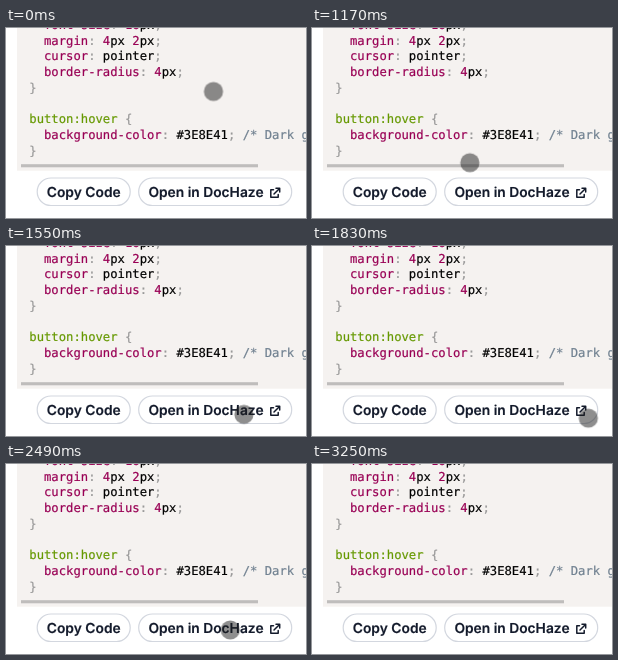
An HTML page for the animation above (4540 ms loop, 300 px wide and 190 px high).

```html
<!DOCTYPE html>
<html lang="en">
<head>
<meta charset="utf-8">
<title>Code sample with buttons</title>
<style>
  html, body { margin: 0; width: 100%; height: 100%; overflow: hidden; background: #fff; }
  svg { display: block; width: 300px; height: 190px; }
  text { white-space: pre; text-rendering: geometricPrecision; }
  .code { font: 12.22px "DejaVu Sans Mono", monospace; color: #000; }
  .code text, .code tspan { fill: currentColor; stroke: currentColor; stroke-width: .2; }
  .property, .number { color: #905; }
  .selector { color: #690; }
  .punctuation { color: #999; }
  .comment { color: #708090; }
  .button rect { fill: #fff; stroke: #d3d7df; stroke-width: 1.2; }
  .button text { font: 600 13.8px Inter, sans-serif; fill: #131a2b; stroke: #131a2b; stroke-width: .15; }
  .icon { fill: none; stroke: #131a2b; stroke-width: 1.5; stroke-linecap: round; stroke-linejoin: round; }
  .pointer { fill: rgba(30, 30, 30, .5); animation: roam 4540ms linear infinite; }

  @keyframes roam {
    0%      { transform: translate(207.5px, 63.5px); animation-timing-function: step-end; }
    21.806% { transform: translate(203.5px, 67.5px); }
    23.789% { transform: translate(181px, 95px); }
    26.211% { transform: translate(153px, 143px); }
    28.194% { transform: translate(144.5px, 164px); }
    29.295% { transform: translate(147px, 168px); }
    30.617% { transform: translate(160px, 168.5px); }
    31.938% { transform: translate(190px, 168.3px); }
    33.040% { transform: translate(218px, 168px); }
    35.242% { transform: translate(257px, 168.7px); }
    37.445% { transform: translate(274px, 170.7px); }
    40.308% { transform: translate(276.6px, 172.2px); }
    41.850% { transform: translate(258px, 170.5px); }
    43.172% { transform: translate(229px, 168px); }
    45.154% { transform: translate(189px, 166px); }
    47.357% { transform: translate(156px, 165.8px); }
    49.559% { transform: translate(144px, 166px); }
    51.542% { transform: translate(158px, 166px); }
    53.304% { transform: translate(192px, 166px); }
    54.846% { transform: translate(224px, 166px); }
    56.608% { transform: translate(247px, 165.5px); }
    59.031% { transform: translate(269px, 164.8px); }
    61.894% { transform: translate(281px, 164.3px); animation-timing-function: step-end; }
    71.145% { transform: translate(291px, 171px); opacity: 1; animation-timing-function: step-end; }
    71.586%, 100% { transform: translate(291px, 171px); opacity: 0; }
    0%, 61.894% { opacity: 1; }
  }
</style>
</head>
<body>
<svg viewBox="0 0 300 190">
  <rect x="11" width="289" height="142.7" fill="#f5f2f0"/>
  <g class="code">
    <text x="38" y=".8"><tspan class="property">font-size</tspan><tspan class="punctuation">:</tspan> <tspan class="number">16</tspan>px<tspan class="punctuation">;</tspan></text>
    <text x="38" y="16.6"><tspan class="property">margin</tspan><tspan class="punctuation">:</tspan> <tspan class="number">4</tspan>px <tspan class="number">2</tspan>px<tspan class="punctuation">;</tspan></text>
    <text x="38" y="32.4"><tspan class="property">cursor</tspan><tspan class="punctuation">:</tspan> pointer<tspan class="punctuation">;</tspan></text>
    <text x="38" y="48.1"><tspan class="property">border-radius</tspan><tspan class="punctuation">:</tspan> <tspan class="number">4</tspan>px<tspan class="punctuation">;</tspan></text>
    <text x="23.3" y="63.8" class="punctuation">}</text>
    <text x="23.3" y="95.4"><tspan class="selector">button:hover</tspan> <tspan class="punctuation">{</tspan></text>
    <text x="38" y="111.1"><tspan class="property">background-color</tspan><tspan class="punctuation">:</tspan> #3E8E41<tspan class="punctuation">;</tspan> <tspan class="comment">/* Dark green */</tspan></text>
    <text x="23.3" y="126.8" class="punctuation">}</text>
  </g>
  <rect x="15" y="136.2" width="237" height="3.1" fill="#bfbdbc"/>

  <g class="button">
    <rect x="31.2" y="150" width="93" height="27.5" rx="13.75"/>
    <text x="40.8" y="168.5">Copy Code</text>
  </g>
  <g class="button">
    <rect x="132.7" y="150" width="153" height="27.5" rx="13.75"/>
    <text x="142.4" y="168.5">Open in DocHaze</text>
  </g>
  <path class="icon" d="M267.5 161.8H264.8V169.3H272.2V166.5M268 166L273.3 160.7M270 160.2H273.7V163.9"/>

  <circle class="pointer" r="9.6"/>
</svg>
</body>
</html>
```
